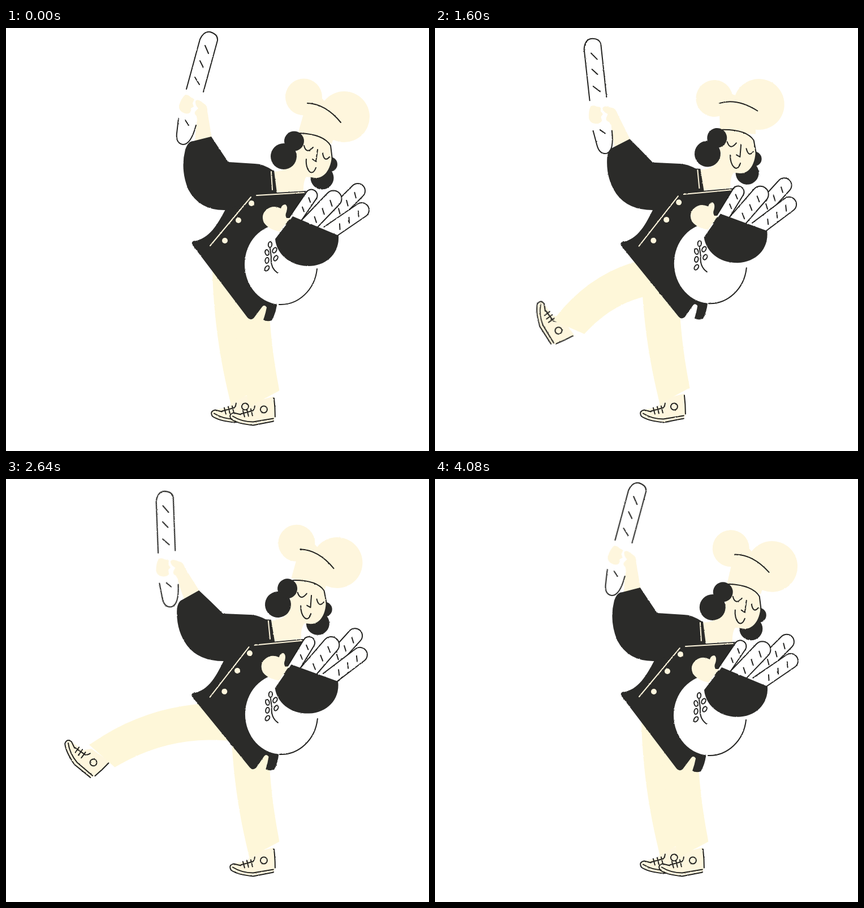
An HTML page that plays this animation: 748 by 748 pixels, repeating every 4160 ms.

```html
<!DOCTYPE html>
<html lang="en">
<head>
<meta charset="utf-8">
<title>Dancing baker</title>
<style>
  html, body { margin: 0; width: 100%; height: 100%; overflow: hidden; background: #fff; }
  svg { display: block; width: 100%; height: 100%; }
  .dark { fill: #2b2b29; }
  .cream { fill: #fef6dd; }
  .pants { fill: #fef7d9; }
  .white { fill: #fff; }
  .line { fill: none; stroke: #232321; stroke-width: 2; stroke-linecap: round; stroke-linejoin: round; }
  .seam { fill: none; stroke: #fef6dd; stroke-width: 2; stroke-linecap: round; }
  .loaf { fill: #fff; stroke: #232321; stroke-width: 2; }
</style>
</head>
<body>
<svg viewBox="0 0 748 748">
  <defs>
    <filter id="rough" x="0" y="0" width="748" height="748" filterUnits="userSpaceOnUse" color-interpolation-filters="sRGB">
      <feTurbulence type="fractalNoise" baseFrequency=".25" numOctaves="2" seed="4"/>
      <feDisplacementMap in="SourceGraphic" scale="2" xChannelSelector="R" yChannelSelector="G"/>
    </filter>
    <g id="shoe">
      <path class="cream" d="M-22 6L-30 20L-56 25Q-64 30-54 38Q-38 46-20 47L16 40L19 32L17-4Z"/>
      <path class="line" d="M17-1Q19 15 19 32M16 40L-20 47Q-48 44-59 36Q-64 27-54 25L-42 28M-56 31Q-40 41-20 41L16 35
        M-42 27L-20 21Q-17 17-17 13M-38 21l3 11M-31 19l3 12M-24 18l3 12"/>
      <circle class="line" cx="-1" cy="19" r="6"/>
    </g>
  </defs>
  <g filter="url(#rough)">
    <use id="shoeB" href="#shoe"/><path id="legB" class="pants"/>
    <use id="shoeA" href="#shoe"/><path id="legA" class="pants"/>

    <path id="forearm" class="cream"/>
    <g id="baton">
      <path class="white" d="M319 108L343 20Q350 5 361 7Q375 11 374 22L336 172Q329 207 313 206Q300 204 302 186Z"/>
      <path class="line" d="M319 108L343 20Q350 5 361 7Q375 11 374 22L349 113M305 160L302 186Q300 204 313 206Q327 206 336 172
        M352 31l6 14M343 58l6 12M334 87l8 13M317 163l6 9"/>
      <path class="cream" d="M317 118Q323 118 326 122L333 126L330 133L332 139L327 142L326 149Q321 154 312 149Q305 145 306 137Q310 124 317 118Z"/>
      <path class="cream" d="M335 129Q339 125 345 130L353 136Q358 141 355 156L338 162L337 156Q331 150 336 146L340 142Q334 136 335 129Z"/>
    </g>

    <g id="torso">
      <path class="cream" d="M472 254Q505 254 512 225L540 255Q525 262 526 288L478 291Z"/>
      <path class="dark" d="M331 377C360 374 375 345 388 321L400 245L474 252L479 291L531 288C510 325 490 360 465 420L479 490
        Q477 505 470 517Q462 520 455 516Q459 505 461 494Q457 488 453 493L438 513Q432 518 427 512L330 384Q327 379 331 377Z"/>
    </g>
    <path id="sleeve" class="dark"/>
    <g id="trim">
      <path class="seam" d="M469 254L471 286M443 296L527 291M433 299L361 385"/>
      <g class="cream"><circle cx="434" cy="310" r="5"/><circle cx="411" cy="340" r="5"/><circle cx="387" cy="376" r="5"/></g>
    </g>

    <g id="head">
      <g id="hat">
        <g class="cream">
          <circle cx="526.500" cy="122" r="32.500"/>
          <circle cx="598" cy="157" r="45"/>
          <path d="M528 145L555 120L590 160L576 205L517 184Z"/>
        </g>
        <path class="line" d="M533 133Q565 134 592 167"/>
      </g>
      <g class="dark">
        <circle cx="573" cy="241" r="13"/>
        <circle cx="559" cy="265" r="20.500"/>
      </g>
      <path class="cream" d="M520 188C550 186 570 196 575 210C580 238 568 267 546 265Q532 262 524 264L500 256Q514 230 514 210Z"/>
      <g class="dark">
        <circle cx="491" cy="227" r="23"/>
        <circle cx="509.500" cy="200" r="17.500"/>
      </g>
      <path class="line" d="M520 186Q562 188 574 208L577 232M527 208Q531 224 543 211M560 222Q563 238 572 228
        M551 215L548 236L542 232M531 232C529 250 541 266 548 247"/>
    </g>

    <g id="plate">
      <ellipse class="white" cx="487" cy="418" rx="65" ry="71"/>
      <path class="line" d="M550 426A65 71 0 0 1 483 489M480 433Q467 424 469 405L467 390"/>
      <g id="sprig" class="line"></g>
    </g>

    <g id="basket">
      <g id="loaves"></g>
      <path class="dark" d="M507 333L588 367C590 400 565 421 534 421C500 420 478 398 476 373Z"/>
      <path class="cream" d="M484 360Q464 356 456 344Q450 330 461 321Q472 312 486 319Q488 312 494 312Q499 315 496 325Q493 331 496 336L503 336Z"/>
    </g>
  </g>
</svg>
<script>
const el = id => document.getElementById(id);
const set = (id, name, value) => el(id).setAttribute(name, value);
const HALF = 2080, LOOP = 2 * HALF, STEP = 80, RAD = Math.PI / 180;

// Eased 0 to 1 between two times
function ramp(t, from, to) {
  const u = Math.min(1, Math.max(0, (t - from) / (to - from)));
  return u * u * (3 - 2 * u);
}
// Eases up, holds, then eases back down
const pulse = (t, up, top, drop, end) => ramp(t, up, top) - ramp(t, drop, end);

// Loaf with an open lower end and slanted cuts along its axis
function loaf(x, y, tipX, tipY, r, cuts) {
  const len = Math.hypot(tipX - x, tipY - y), angle = Math.atan2(tipX - x, y - tipY) / RAD;
  let marks = '';
  for (let i = 0; i < cuts; i++) marks += `M${-r * .15} ${6 - len + i * 20}l${r * .65} 5`;
  return `<g transform="translate(${x} ${y}) rotate(${angle})">
    <path class="loaf" d="M${-r} 0V${-len}A${r} ${r} 0 0 1 ${r} ${-len}V0"/><path class="line" d="${marks}"/></g>`;
}
el('loaves').innerHTML = loaf(560, 350, 622, 288, 13, 3) + loaf(569, 363, 629, 322, 13, 3)
  + loaf(508, 343, 540, 296, 10.5, 2) + loaf(532, 351, 579, 302, 14.5, 3);

function leaf(x, y, tilt) {
  return `<ellipse rx="3.200" ry="5" transform="translate(${x} ${y}) rotate(${tilt})"/>`;
}
let leaves = leaf(467, 383, 5);
for (let i = 0; i < 3; i++) {
  leaves += leaf(461.5, 397 + i * 14, -15 + i * 25);
  if (i < 2) leaves += leaf(475 + i * 2, 393 + i * 14, 30);
}
el('sprig').innerHTML = leaves;

// Swings points near the cuff outwards and down, leaving the shoulder in place
function bendArm(path, a) {
  return path.replace(/(\d+) (\d+)/g, (_, x, y) => {
    const high = Math.max(0, (322 - y) / 130), out = Math.max(0, (440 - x) / 115);
    return `${x - 40 * a * high ** 2} ${+y + 30 * a * out ** 3 * Math.sqrt(high)}`;
  });
}

function drawArm(a, turn) {
  const hx = 331 - 77 * a, hy = 136 + 47 * a ** 1.6;
  const s = Math.sin(turn * RAD), c = Math.cos(turn * RAD);
  const wrist = (x, y) => `${hx + x * c - y * s} ${hy + x * s + y * c}`;
  set('baton', 'transform', `translate(${hx} ${hy}) rotate(${turn}) translate(-331 -136)`);
  set('forearm', 'd', `${bendArm('M334 202L364 195', a)}L${wrist(25, 11)}L${wrist(6, 24)}Z`);
  set('sleeve', 'd', bendArm('M474 253Q455 240 440 240L393 237Q378 215 363 192L331 200Q322 200 317 215'
    + 'Q308 250 322 285Q342 323 388 322L475 291Z', a));
}

function drawLeg(name, hx, hy, swing, reach, bend, foot) {
  const s = Math.sin(swing * RAD), c = Math.cos(swing * RAD);
  const ax = hx - reach * s, ay = hy + reach * c;
  const kx = (hx + ax) / 2 - bend * c, ky = (hy + ay) / 2 - bend * s;
  const front = [], back = [];
  for (let i = 0; i <= 12; i++) {
    const u = i / 12, v = 1 - u;
    const x = v * v * hx + 2 * u * v * kx + u * u * ax;
    const y = v * v * hy + 2 * u * v * ky + u * u * ay;
    let dx = v * (kx - hx) + u * (ax - kx), dy = v * (ky - hy) + u * (ay - ky);
    const len = Math.hypot(dx, dy), w = 33 - 4 * u, skew = i === 12 ? 8 : 0;
    dx /= len; dy /= len;
    front.push(`${x - dy * w + dx * skew} ${y + dx * w + dy * skew}`);
    back.unshift(`${x + dy * w - dx * skew} ${y - dx * w - dy * skew}`);
  }
  set('leg' + name, 'd', 'M' + front.concat(back).join('L') + 'Z');
  set('shoe' + name, 'transform', `translate(${ax} ${ay}) rotate(${foot})`);
}

// The toe dips as a kick starts and flexes up as the leg drops
function kick(name, hx, hy, t, up, top, drop, end) {
  const lift = pulse(t, up, top, drop, end);
  const dip = pulse(t, up - 80, up + 80, up + 120, up + 400);
  const flex = pulse(t, drop - 240, drop + 120, drop + 200, end);
  const knee = 4 * lift * (1 - lift);
  drawLeg(name, hx, hy, -6.7 + 82 * lift, 222 + 14 * lift - 18 * flex,
    12 + 28 * lift + 32 * knee, 50 * lift - 48 * dip + 25 * flex);
}

function draw(t) {
  const half = t % HALF;
  const lean = pulse(half, 0, 1000, 1180, 2060);
  const arm = pulse(half, 40, 1020, 1120, 2040);
  const hat = -23.5 * pulse(half, 520, 1280, 1360, 2160);
  for (const id of ['torso', 'trim']) set(id, 'transform', `rotate(${-3.5 * lean} 380 395)`);
  set('head', 'transform', `translate(${-17 * lean} ${-8.5 * lean}) rotate(${-6.5 * lean} 491 227)`);
  set('hat', 'transform', `rotate(${hat + 6.5 * lean} 548 193)`);
  set('plate', 'transform', `translate(${1.5 * lean} ${-3.5 * lean})`);
  set('basket', 'transform', `translate(0 ${-6.5 * lean}) rotate(${-5 * lean} 485 380)`);
  drawArm(arm, (t < HALF ? -46 : -32) * arm);
  kick('A', 431, 435, t, 440, 960, 1480, 2000);
  kick('B', 398, 430, t, 2100, 2620, 3160, 3840);
}

const start = performance.now();
let shown = -1;
function tick() {
  const t = Math.floor((performance.now() - start) % LOOP / STEP) * STEP;
  if (t !== shown) draw(shown = t);
  requestAnimationFrame(tick);
}
tick();
</script>
</body>
</html>
```
